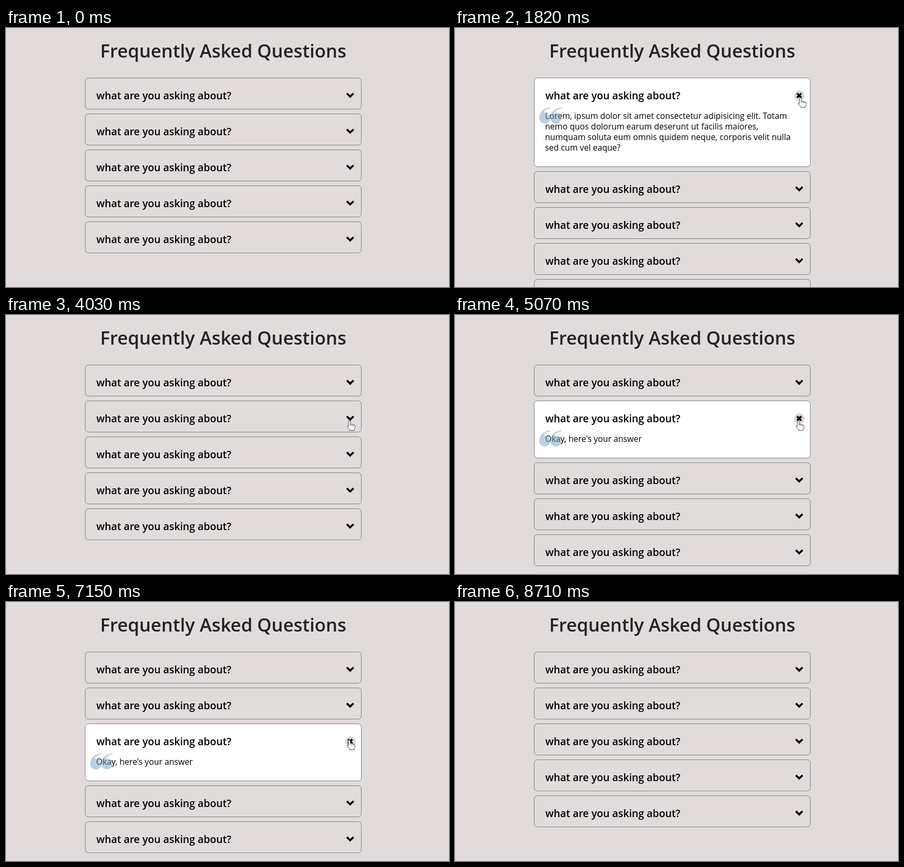
An HTML page for the animation above (8840 ms loop, 836 px wide and 490 px high).

```html
<!DOCTYPE html>
<html lang="en">
<head>
<meta charset="utf-8">
<title>Frequently Asked Questions</title>
<style>
  html, body { margin: 0; width: 100%; height: 100%; overflow: hidden; background: #e1dcdb; }
  svg { display: block; width: 836px; height: 490px; font-family: "Open Sans", "Noto Sans", sans-serif; }
  .title { font-size: 34.4px; font-weight: 600; fill: #222; text-anchor: middle; }
  .question { font-size: 19.3px; font-weight: 600; }
  .answer { font-size: 15.65px; }
  .box { fill: none; stroke: #808080; }
  .open .box { fill: #fff; }
  .icon { fill: none; stroke: #000; stroke-width: 3.7; }
  .quote { fill: #75a1c1; opacity: .5; }
  .button { fill: #dcd7d5; }
  .hand { fill: #fff; stroke: #4a4a4a; stroke-linejoin: round; }
</style>
</head>
<body>
<svg viewBox="0 0 836 490">
  <text class="title" x="410" y="56">Frequently Asked Questions</text>
  <g id="list"></g>
  <g id="cursor">
    <path class="hand" d="M-1.8 11V1.8a1.8 1.8 0 0 1 3.6 0V6.6q1.9-1.2 3 .5 1.8-.9 2.9.8 2.8-.6 2.8 2v3.3q0 2-1.5 3.7v1.6H.4v-1.6L-4.1 11.8q-.9-2 .7-2.3z"/>
    <path class="hand" d="M1.8 6.6v3M4.8 7.1v3M7.7 7.9v2.7"/>
  </g>
</svg>
<script>
const LOOP = 8840, STEP = 130;
const short = ["Okay, here's your answer"];
const answers = [[
  "Lorem, ipsum dolor sit amet consectetur adipisicing elit. Totam",
  "nemo quos dolorum earum deserunt ut facilis maiores,",
  "numquam soluta eum omnis quidem neque, corporis velit nulla",
  "sed cum vel eaque?"
], short, short, short, short];

// Open and close time of the first three items
const openTimes = [[1820, 3250], [4290, 5460], [5980, 7540]];

// Cursor stops: time, x, y of the fingertip
const stops = [
  [520, 640, 250], [1300, 653, 134], [1430, 652, 132], [2600, 652, 132],
  [2990, 650, 126], [3380, 650, 126], [4030, 648, 200], [5460, 648, 200],
  [5850, 648, 261], [8190, 648, 261], [8710, 640, 330]
];

const list = document.getElementById("list");
const cursor = document.getElementById("cursor");
const mark = "M21 0C7 2 0 10 0 20.5A10.3 10.3 0 1 0 8 10.5C10 6 14 3 21 2Z";
const smooth = u => u * u * (3 - 2 * u);

function item(lines, open, y) {
  const height = open ? 88 + 20 * lines.length : 59;
  const details = open ? `
    <circle class="button" cx="500.5" cy="33.5" r="10"/>
    <path class="icon" d="M496 29.3l8 8m0-8l-8 8"/>
    ${lines.map((line, i) => `<text class="answer" x="20.5" y="${77.5 + 20 * i}">${line}</text>`).join("")}
    <path class="quote" transform="translate(9.5 55.5)" d="${mark}"/>
    <path class="quote" transform="translate(30.5 55.5)" d="${mark}"/>` : `
    <path class="icon" d="M493.7 29.2l6.3 6.2 6.3-6.2"/>`;
  return `<g class="${open ? "open" : ""}" transform="translate(149.5 ${y})">
    <rect class="box" width="521" height="${height}" rx="6"/>
    <text class="question" x="21" y="40">what are you asking about?</text>${details}</g>`;
}

function drawList(active) {
  let y = 94.5;
  list.innerHTML = answers.map((lines, i) => {
    const markup = item(lines, i === active, y);
    y += i === active ? 97 + 20 * lines.length : 68;
    return markup;
  }).join("");
}

function moveCursor(t) {
  const next = stops.findIndex(stop => stop[0] > t);
  cursor.style.display = next > 0 ? "" : "none";
  if (next < 1) return;
  const [t0, x0, y0] = stops[next - 1], [t1, x1, y1] = stops[next];
  const u = smooth((t - t0) / (t1 - t0));
  cursor.setAttribute("transform", `translate(${x0 + (x1 - x0) * u} ${y0 + (y1 - y0) * u})`);
}

let shown;
function frame() {
  const t = Math.floor(performance.now() % LOOP / STEP) * STEP;
  const active = openTimes.findIndex(([from, to]) => t >= from && t < to);
  if (active !== shown) drawList(shown = active);
  moveCursor(t);
  requestAnimationFrame(frame);
}
frame();
</script>
</body>
</html>
```
